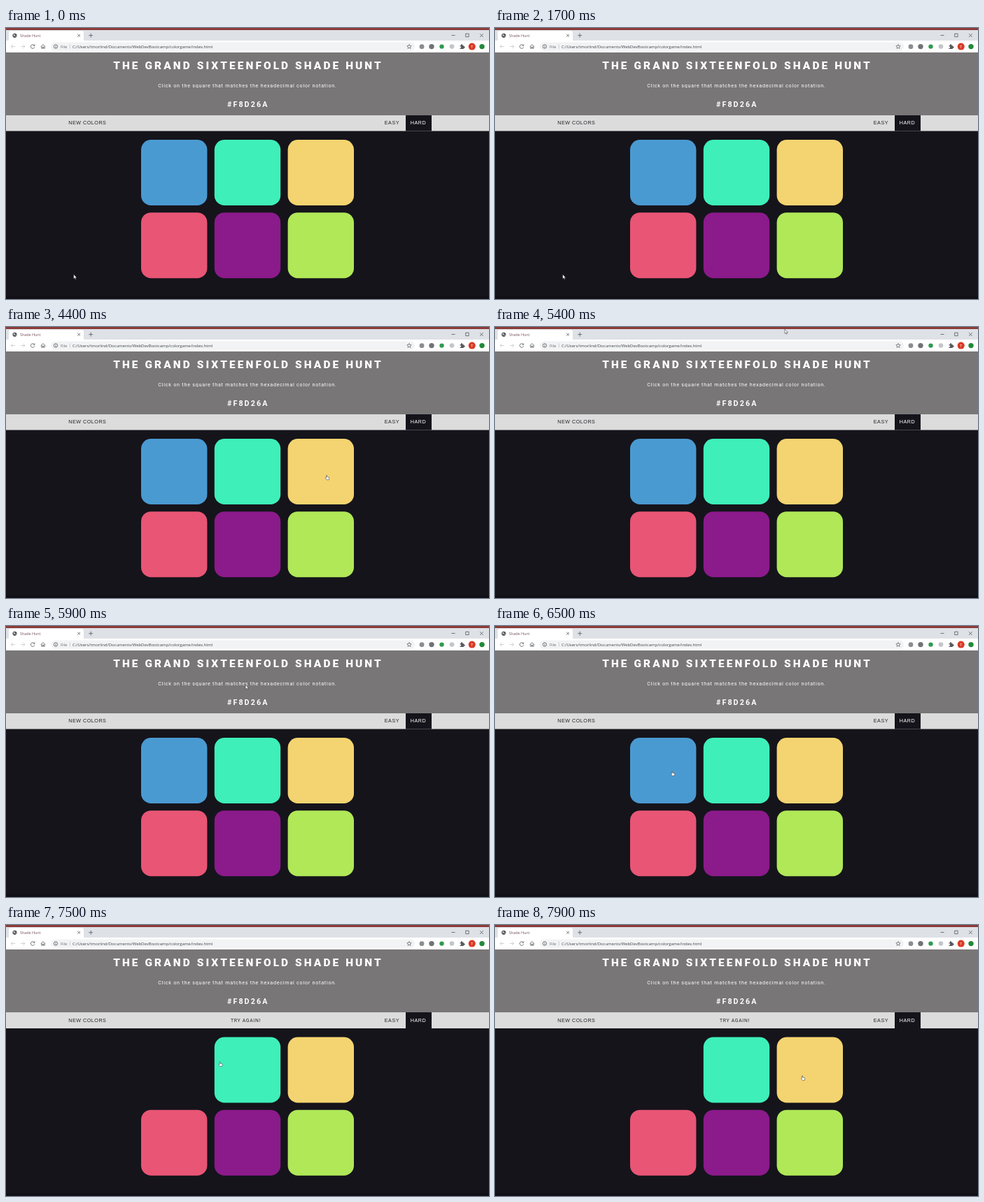
These frames come from a looping animation (690x388 px, 8 s). An HTML page:

```html
<!DOCTYPE html>
<html lang="en">
<head>
<meta charset="utf-8">
<title>Shade Hunt</title>
<style>
  html, body { margin: 0; width: 100%; height: 100%; overflow: hidden; background: #15141b; }
  svg { display: block; width: 100%; height: 100%; }
  .ui { font-family: "Open Sans", "Noto Sans", sans-serif; }
  .page { font-family: Roboto, sans-serif; fill: #fff; text-anchor: middle; }
  .btn { font: 7.2px "Liberation Sans", Arial, sans-serif; letter-spacing: .5px; fill: #25252b; }
  .line { fill: none; stroke: #55585c; stroke-width: .8; }
</style>
</head>
<body>
<svg viewBox="0 0 690 388" xmlns="http://www.w3.org/2000/svg">
  <rect width="690" height="388" fill="#15141b"/>
  <rect y="384" width="690" height="4" fill="#111016"/>

  <!-- Tab strip -->
  <rect width="690" height="19" fill="#dee1e6"/>
  <rect width="690" height="3" fill="#8c3b38"/>
  <path d="M1 19Q4 19 4 16V7Q4 4 7 4H108Q111 4 111 7V16Q111 19 114 19Z" fill="#fff"/>
  <circle cx="12.5" cy="10.8" r="3.1" fill="#55585c"/>
  <path d="M10.6 9.3l1.8.3.4 1.2-1.2 1zM13.4 11.2l1.4.4-.8 1.2z" fill="#fff"/>
  <text class="ui" x="20" y="12.7" font-size="5.4" fill="#75505a">Shade Hunt</text>
  <path class="line" d="M102.2 8.8l3.8 3.8m0-3.8l-3.8 3.8"/>
  <path class="line" d="M118.2 10.7h6m-3-3v6" stroke-width="1"/>
  <path class="line" d="M636.5 10.5h5M656.7 8.2h4.4v4.4h-4.4zM677 8.2l4.8 4.8m0-4.8l-4.8 4.8"/>

  <!-- Toolbar -->
  <rect y="18" width="690" height="17" fill="#fff"/>
  <rect x="64" y="20.5" width="520" height="12" rx="6" fill="#f1f3f4"/>
  <path class="line" d="M13 26.5H7.3m2.5-2.6l-2.6 2.6 2.6 2.6M21.2 26.5h5.7m-2.5-2.6l2.6 2.6-2.6 2.6" style="stroke:#c4c6c9"/>
  <path class="line" d="M40.3 24.7a2.8 2.8 0 1 0 .6 2.6M40.9 23.4v2h-2"/>
  <path class="line" d="M49.8 26.6l3.2-2.9 3.2 2.9M50.8 26v3.2h1.6v-2h1.2v2h1.6V26"/>
  <circle class="line" cx="71" cy="26.5" r="2.7"/>
  <path class="line" d="M71 26.2v1.9m0-3.4v.7"/>
  <g class="ui" font-size="5.96">
    <text x="78" y="28.7" fill="#6a6d71">File</text>
    <path d="M91.3 23.5v6" stroke="#b4b7bb" stroke-width=".6"/>
    <text x="95" y="28.7" fill="#414348">C:/Users/tmorlind/Documents/WebDevBootcamp/colorgame/index.html</text>
  </g>
  <path class="line" d="M576 23.4l.9 2.1 2.3.2-1.7 1.5.5 2.2-2-1.2-2 1.2.5-2.2-1.7-1.5 2.3-.2z" style="stroke-width:.7"/>
  <circle cx="594" cy="26.7" r="3.4" fill="#8b8d90"/>
  <circle cx="608" cy="26.6" r="3.7" fill="#707377"/>
  <circle cx="622.5" cy="26.6" r="3.2" fill="#2f9a50"/>
  <circle cx="637" cy="26.6" r="3.3" fill="#c3c6c8"/>
  <path d="M648.5 25h1.6a1.2 1.2 0 1 1 2 0h1.7v1.6a1.2 1.2 0 1 1 0 2v1.4h-5.3v-1.5a1.1 1.1 0 1 0 0-2z" fill="#55585c"/>
  <circle cx="665.7" cy="26.6" r="5" fill="#d93a26"/>
  <text class="ui" x="665.7" y="28.6" font-size="5.4" fill="#fff" text-anchor="middle">T</text>
  <circle cx="680" cy="26.6" r="3.7" fill="#218a38"/>

  <!-- Header -->
  <rect y="35" width="690" height="90" fill="#787677"/>
  <g class="page">
    <text x="346" y="58.8" font-size="15.4" font-weight="900" letter-spacing="3.1">THE GRAND SIXTEENFOLD SHADE HUNT</text>
    <text x="345" y="85.4" font-size="7.2" letter-spacing=".75">Click on the square that matches the hexadecimal color notation.</text>
    <text x="345.7" y="113.2" font-size="10.7" font-weight="700" letter-spacing="2.1">#F8D26A</text>
  </g>

  <!-- Menu bar -->
  <rect class="bar" y="125" width="690" height="22.5" fill="#dcdcdc"/>
  <rect class="bar" x="571" y="125" width="37" height="22.5" fill="#15141b"/>
  <g id="labels" class="btn">
    <text x="89.3" y="138.3">NEW COLORS</text>
    <text x="540.8" y="138.3">EASY</text>
    <text x="577.8" y="138.3" style="fill:#fff">HARD</text>
  </g>
  <text id="message" class="page" x="342.5" y="138.9" font-size="6.8" letter-spacing=".72" style="fill:#25252b">TRY AGAIN!</text>

  <g id="squares"></g>

  <g id="cursor" stroke="#25252b" stroke-width=".5" fill="#fff" stroke-linejoin="round">
    <path id="arrow" d="M0 0V6.2L1.4 5 2.4 7.2 3.4 6.7 2.5 4.6H4.3Z"/>
    <path id="hand" d="M-.6 .5Q0 -.4 .6 .5V2.6L3.2 3.2Q3.9 3.4 3.8 4.2L3.2 6.8H.2L-1.7 4.4Q-1.5 3.5 -.6 4.1Z"/>
  </g>
</svg>
<script>
  const LOOP = 8000, STEP = 100, CLICK = 6800, SIZE = 94.4;
  const colors = ["#4a9ad2", "#3eefb9", "#f4d470", "#e95575", "#8b1a8b", "#b0e858"];
  // Pointer stops: time, x, y
  const stops = [
    [0, 96.7, 352.8], [1700, 96.7, 352.8], [2200, 290, 290], [2400, 290, 290],
    [2800, 225, 219.5], [3400, 225, 219.5], [3700, 458, 212], [4700, 458, 212],
    [5000, 580, 120], [5400, 414, 3.2], [5600, 400, 4], [6300, 253, 207.7],
    [6800, 253, 207.7], [7200, 335, 145], [7600, 300, 205], [7900, 439, 215.5], [LOOP, 439, 215.5]
  ];
  const $ = id => document.getElementById(id);
  const show = (el, on) => el.setAttribute("visibility", on ? "visible" : "hidden");

  const squares = colors.map((fill, i) => {
    const el = document.createElementNS("http://www.w3.org/2000/svg", "rect");
    const x = 193 + (i % 3) * 104.8, y = 160 + Math.floor(i / 3) * 104.2;
    const attrs = { x, y, width: SIZE, height: 94, rx: 14.2, fill };
    for (const key in attrs) el.setAttribute(key, attrs[key]);
    $("squares").append(el);
    return { el, x, y };
  });

  function pointerAt(t) {
    const i = stops.findIndex(s => s[0] > t);
    const [t0, x0, y0] = stops[i - 1], [t1, x1, y1] = stops[i];
    const u = (t - t0) / (t1 - t0), k = u * u * (3 - 2 * u);
    return [x0 + (x1 - x0) * k, y0 + (y1 - y0) * k];
  }

  function draw(time) {
    const t = Math.floor((time % LOOP) / STEP) * STEP;
    const missed = t >= CLICK, drop = missed ? 0.5 : 0;
    const [x, y] = pointerAt(t);

    document.querySelectorAll(".bar").forEach(b => b.setAttribute("height", 22.5 + drop));
    $("labels").setAttribute("transform", `translate(0 ${drop})`);
    $("squares").setAttribute("transform", `translate(0 ${drop})`);
    show($("message"), missed);
    show(squares[0].el, !missed);

    const over = squares.some((s, i) => !(missed && i === 0) &&
      x > s.x && x < s.x + SIZE && y > s.y && y < s.y + SIZE);
    $("cursor").setAttribute("transform", `translate(${x} ${y})`);
    show($("hand"), over);
    show($("arrow"), !over);
  }

  let start;
  function tick(now) {
    start ??= now;
    draw(now - start);
    requestAnimationFrame(tick);
  }
  draw(0);
  requestAnimationFrame(tick);
</script>
</body>
</html>
```
